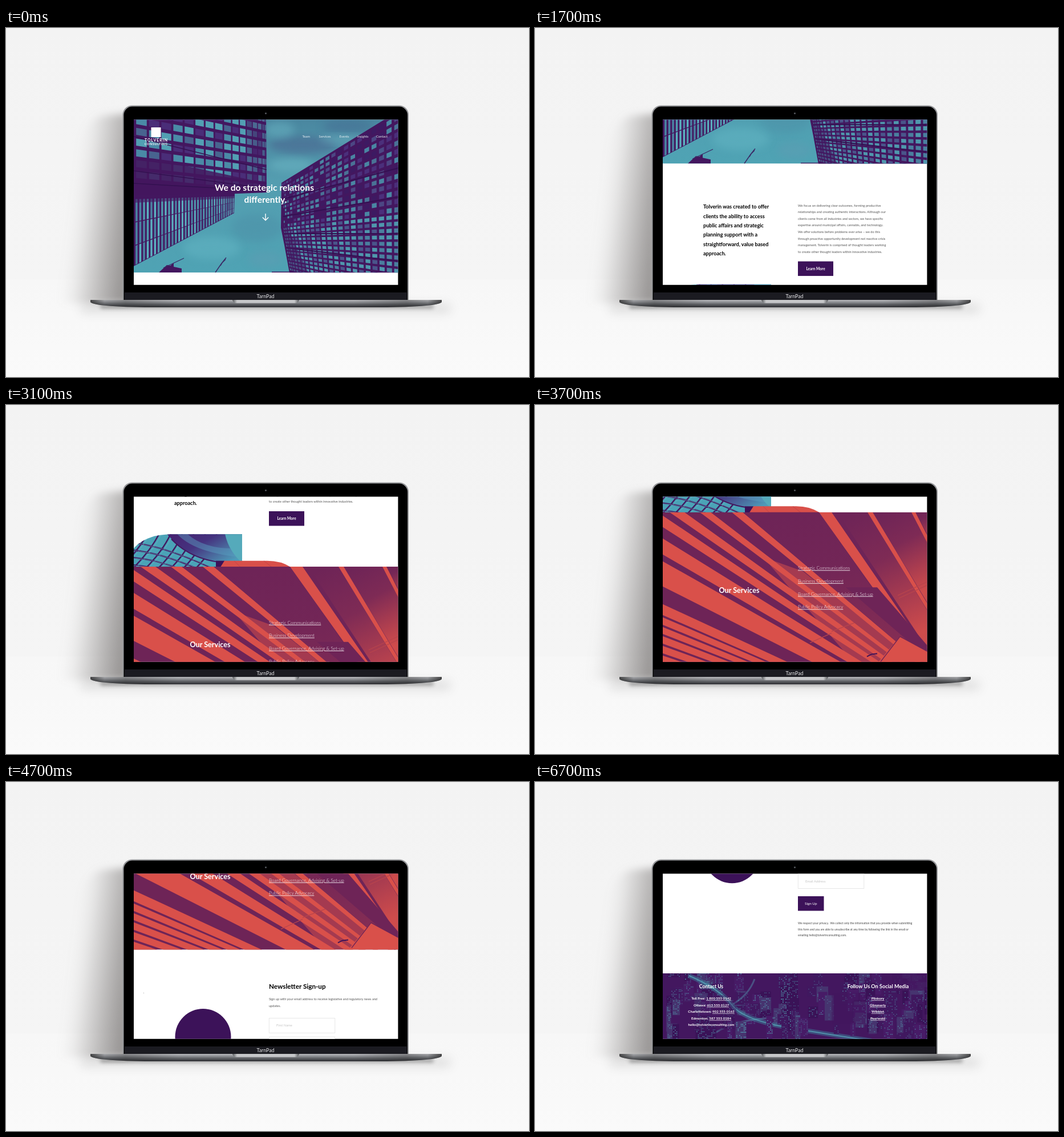
Recreate the animation shown at these times as an HTML page. Size 917 px wide and 611 px high, loop 7400 ms.

```html
<!DOCTYPE html>
<html lang="en">
<head>
<meta charset="utf-8">
<title>Website on a laptop</title>
<style>
  html, body { margin: 0; width: 100%; height: 100%; overflow: hidden; background: #f5f5f5; }
  svg { display: block; width: 100vw; height: 100vh; }
  text { font-family: Lato, "Open Sans", sans-serif; white-space: pre; }
  .u { text-decoration: underline; text-decoration-thickness: .5px; text-underline-offset: 1.6px; }
</style>
</head>
<body>
<svg viewBox="0 0 917 611" preserveAspectRatio="none">
  <defs>
    <linearGradient id="wall" x1="0" y1="0" x2="0" y2="1">
      <stop offset="0" stop-color="#f3f3f3"/><stop offset="1" stop-color="#f5f5f5"/>
    </linearGradient>
    <linearGradient id="floor" x1="0" y1="0" x2="0" y2="1">
      <stop offset="0" stop-color="#f7f7f7"/><stop offset=".4" stop-color="#f8f8f8"/><stop offset="1" stop-color="#fafafa"/>
    </linearGradient>
    <linearGradient id="shade" gradientUnits="userSpaceOnUse" x1="98" y1="440" x2="205" y2="453">
      <stop offset="0" stop-color="#8a8786" stop-opacity="0"/>
      <stop offset=".2" stop-color="#8a8786" stop-opacity=".09"/>
      <stop offset=".45" stop-color="#8a8786" stop-opacity=".34"/>
      <stop offset=".7" stop-color="#8a8786" stop-opacity=".6"/>
      <stop offset="1" stop-color="#8a8786" stop-opacity=".88"/>
    </linearGradient>
    <linearGradient id="base" x1="0" y1="0" x2="0" y2="1">
      <stop offset="0" stop-color="#b9babd"/><stop offset=".3" stop-color="#8f9195"/>
      <stop offset=".6" stop-color="#5f6165"/><stop offset="1" stop-color="#2c2d31"/>
    </linearGradient>
    <linearGradient id="ends">
      <stop offset="0" stop-color="#222" stop-opacity=".75"/><stop offset=".04" stop-color="#222" stop-opacity=".1"/>
      <stop offset=".1" stop-color="#222" stop-opacity=".3"/><stop offset=".25" stop-color="#222" stop-opacity="0"/>
      <stop offset=".75" stop-color="#222" stop-opacity="0"/><stop offset=".9" stop-color="#222" stop-opacity=".3"/>
      <stop offset=".96" stop-color="#222" stop-opacity=".1"/><stop offset="1" stop-color="#222" stop-opacity=".75"/>
    </linearGradient>
    <linearGradient id="notch">
      <stop offset="0" stop-color="#55575a"/><stop offset=".07" stop-color="#c6c7c9"/>
      <stop offset=".93" stop-color="#c6c7c9"/><stop offset="1" stop-color="#55575a"/>
    </linearGradient>
    <linearGradient id="sky" x1="0" y1="0" x2="0" y2="1">
      <stop offset="0" stop-color="#4a87a0"/><stop offset=".4" stop-color="#549db0"/><stop offset="1" stop-color="#4fa3b4"/>
    </linearGradient>
    <linearGradient id="dome" x1="0" y1="0" x2="1" y2=".7">
      <stop offset="0" stop-color="#47206f"/><stop offset=".45" stop-color="#45337f"/><stop offset="1" stop-color="#4e9ab8"/>
    </linearGradient>
    <linearGradient id="glow" x1=".2" y1="0" x2=".5" y2="1">
      <stop offset="0" stop-color="#d9504a" stop-opacity="0"/><stop offset=".4" stop-color="#d9504a" stop-opacity=".15"/>
      <stop offset="1" stop-color="#d9504a" stop-opacity=".9"/>
    </linearGradient>
    <filter id="soft" x="-30%" y="-30%" width="160%" height="160%"><feGaussianBlur stdDeviation="7"/></filter>
    <filter id="near" x="-10%" y="-200%" width="120%" height="500%"><feGaussianBlur stdDeviation="3"/></filter>
    <filter id="far" x="-10%" y="-300%" width="120%" height="700%"><feGaussianBlur stdDeviation="9"/></filter>
    <clipPath id="screen"><rect x="224" y="160.400" width="463.400" height="289.400"/></clipPath>
    <clipPath id="hero"><rect x="224" y="160" width="464" height="268.200"/></clipPath>
    <clipPath id="towerA"><path d="M224 160H456L457 286 224 294Z"/></clipPath>
    <clipPath id="towerB"><path d="M224 296 401 292 400 323 224 416Z"/></clipPath>
    <clipPath id="towerC"><path d="M483 271 664 160H688V429H497L483 350Z"/></clipPath>
    <clipPath id="arch"><path d="M224 697V664Q245 640 290 639.600H414V697Z"/></clipPath>
    <clipPath id="services"><rect x="224" y="696.300" width="464" height="264.700"/></clipPath>
    <clipPath id="footer"><rect x="224" y="1320.500" width="464" height="116"/></clipPath>
  </defs>

  <rect width="917" height="441" fill="url(#wall)"/>
  <rect y="440" width="917" height="171" fill="url(#floor)"/>
  <path d="M214 150 172 153Q142 156 128 200L86 440 100 482H214Z" fill="url(#shade)" filter="url(#soft)"/>
  <rect x="130" y="484" width="650" height="14" rx="7" fill="#777" opacity=".22" filter="url(#far)"/>
  <rect x="165" y="485" width="585" height="6" rx="3" fill="#666" opacity=".6" filter="url(#near)"/>

  <path d="M204.500 477V152A16.500 16.500 0 0 1 221 135.500H689.500A16.500 16.500 0 0 1 706 152V477Z" fill="#96979a"/>
  <path d="M206.500 477V152.500A15 15 0 0 1 221.500 137.500H689A15 15 0 0 1 704 152.500V477Z" fill="#000"/>
  <rect x="208" y="463" width="495" height="13.500" fill="#1b1b21"/>
  <circle cx="455.500" cy="149.500" r="1.800" fill="#34363a"/>
  <circle cx="455.500" cy="149.500" r=".7" fill="#85888c"/>
  <text x="455" y="473" font-size="8.800" fill="#e6e6e8" text-anchor="middle">TarnPad</text>

  <g id="deck">
    <path d="M148 476H764V480Q759 484 737 486 705 489 655 489H257Q207 489 175 486 153 484 148 480Z" fill="url(#base)"/>
    <path d="M148 476H764V480Q759 484 737 486 705 489 655 489H257Q207 489 175 486 153 484 148 480Z" fill="url(#ends)"/>
    <path d="M397 476H514Q513 481.500 507 481.500H404Q398 481.500 397 476Z" fill="url(#notch)"/>
  </g>

  <g clip-path="url(#screen)">
    <rect x="224" y="160" width="464" height="290" fill="#fff"/>
    <g id="page"></g>
  </g>
</svg>

<script>
const LOOP = 7400, HOLD = 700, STEP = 200, STEPS = 31, SCROLL = 985.5;
const PURPLE = '#43175f', INK = '#3c1259', TEAL = '#56a9b9', RED = '#d9504a', PLUM = '#6e2457';

let seed = 7;
const rand = () => (seed = seed * 16807 % 2147483647) / 2147483647;
const between = (a, b) => a + (b - a) * rand();
const fx = n => n.toFixed(1);

const path = (d, fill, more = '') => `<path d="${d}" fill="${fill}" ${more}/>`;
const line = (d, color, w, more = '') => path(d, 'none', `stroke="${color}" stroke-width="${w}" ${more}`);
const rect = (x, y, w, h, fill, more = '') =>
  `<rect x="${fx(x)}" y="${fx(y)}" width="${fx(w)}" height="${fx(h)}" fill="${fill}" ${more}/>`;
const text = (x, y, size, weight, fill, s, more = '') =>
  `<text x="${x}" y="${fx(y)}" font-size="${size}" font-weight="${weight}" fill="${fill}" ${more}>${s}</text>`;
const lines = (x, y, gap, size, weight, fill, list, more) =>
  list.map((s, i) => text(x, y + i * gap, size, weight, fill, s, more)).join('');
const clip = (id, s) => `<g clip-path="url(#${id})">${s}</g>`;
const MID = 'text-anchor="middle"';

// Window panes on a four-cornered facade; bend bunches the columns together.
function facade([a, b, c, d], cols, rows, gapU, gapV, bend, tones) {
  const at = (s, v) => {
    const u = bend(s), mix = k =>
      (a[k] * (1 - u) + b[k] * u) * (1 - v) + (d[k] * (1 - u) + c[k] * u) * v;
    return fx(mix(0)) + ' ' + fx(mix(1));
  };
  const ds = tones.map(() => '');
  for (let i = 0; i < cols; i++) for (let j = 0; j < rows; j++) {
    const u0 = (i + gapU) / cols, u1 = (i + 1) / cols, v0 = (j + gapV) / rows, v1 = (j + 1) / rows;
    ds[Math.floor(rand() * tones.length)] += `M${at(u0, v0)}L${at(u1, v0)} ${at(u1, v1)} ${at(u0, v1)}Z`;
  }
  return ds.map((p, k) => path(p, tones[k])).join('');
}

function hero() {
  let s = rect(224, 160, 464, 268.2, 'url(#sky)');
  const cloud = (x, y, rx, ry, fill, o) =>
    `<ellipse cx="${x}" cy="${y}" rx="${rx}" ry="${ry}" fill="${fill}" opacity="${o}" filter="url(#soft)"/>`;
  s += cloud(520, 205, 60, 16, '#4a5f8c', .5) + cloud(600, 172, 45, 12, '#456a92', .5)
    + cloud(500, 240, 40, 12, '#6fb9c6', .5) + cloud(480, 178, 26, 14, '#6ab3c2', .5)
    + cloud(590, 195, 40, 8, '#73b7c6', .4) + cloud(440, 350, 45, 25, '#4c8ba4', .4)
    + cloud(360, 385, 50, 20, '#63b6c4', .5) + cloud(455, 405, 30, 14, '#5f9cb2', .5);

  s += path('M224 160H456L457 288 224 297Z', PURPLE);
  s += clip('towerA', facade([[224, 92], [456, 150], [457, 284], [224, 262]], 16, 9, .18, .34,
    t => 1 - (1 - t) ** 1.6, ['#529fb3', '#4a8aa6', '#529fb3', '#48648f', '#4a2d78'])
    + path('M224 228 300 238 457 272V290L224 297Z', PURPLE, 'opacity=".85"')
    + path('M420 160H457V290L420 280Z', PURPLE, 'opacity=".4"')
    + line('M224 190 457 248M224 250 457 281M224 272 457 285', '#331050', 1.5));

  s += path('M224 293 401 289 400 324 224 417Z', PURPLE);
  s += clip('towerB', facade([[224, 298], [403, 294], [403, 324], [224, 422]], 36, 3, .46, .04,
    t => 1 - (1 - t) ** 1.35, ['#509bae', '#5bb0bf', '#4a83a2'])
    + path('M224 296 401 292V298L224 306Z', PURPLE, 'opacity=".6"'));

  s += path('M483 271 664 160H688V429H497L488 380 482 350Z', PURPLE);
  s += clip('towerC', facade([[484, 270], [690, 145], [690, 322], [487, 348]], 22, 12, .34, .4,
    t => t ** 1.5, ['#4a7296', '#4b2f7b', '#4c4784', '#4a86a3', '#3d1a62'])
    + facade([[486, 348], [690, 322], [690, 478], [498, 424]], 22, 13, .3, .38,
      t => t ** 1.5, ['#4f97ad', '#4a7f9f', '#4f97ad', '#4a558b'])
    + line('M484 300 688 245M486 330 688 296M488 360 688 360M492 385 688 408', '#351052', 2.2)
    + path('M500 428 486 345 490 342 530 428Z', PURPLE, 'opacity=".55"'));

  s += path('M268 428 282 415 288 416 294 411V418L308 421V428Z', PURPLE)
    + line('M276 420 312 403', '#3a2a66', 1.3)
    + line('M367 428 378 412 386 402M376 416 379 411 385 405', '#3a2a66', 1.5)
    + rect(466, 426.6, 34, 1.4, PURPLE);
  return clip('hero', s)
    + rect(254.500, 174, 17, 17, '#fff')
    + text(243, 198.6, 6.9, 700, '#fff', 'TOLVERIN', 'letter-spacing="1"')
    + text(243, 205.3, 5.6, 700, '#fff', 'CONSULTING', 'letter-spacing=".5"')
    + [['Team', 519.5], ['Services', 548.5], ['Events', 584.5], ['Insights', 616], ['Contact', 649]]
      .map(([t, x]) => text(x, 192.2, 5.8, 400, '#e6eef2', t)).join('')
    + text(453, 284.8, 15.7, 700, '#fff', 'We do strategic relations', MID)
    + text(455, 305.8, 15.5, 700, '#fff', 'differently.', MID)
    + line('M455 325V336.500M449.800 331.500 455 336.700 460.200 331.500', '#fff', 1.4);
}

const button = (y, w, label, size, weight) =>
  rect(461, y, w, 25.5, INK) + text(461 + w / 2, y + 15, size, weight, '#fff', label, MID);

function about() {
  return lines(295, 506.9, 16.35, 9.1, 700, '#000', [
    'Tolverin was created to offer', 'clients the ability to access', 'public affairs and strategic',
    'planning support with a', 'straightforward, value based', 'approach.'])
    + lines(461, 503.3, 11.6, 5.65, 400, '#555', [
    'We focus on delivering clear outcomes, forming productive',
    'relationships and creating authentic interactions. Although our',
    'clients come from all industries and sectors, we have specific',
    'expertise around municipal affairs, cannabis, and technology.',
    'We offer solutions before problems ever arise – we do this',
    'through proactive opportunity development not reactive crisis',
    'management. Tolverin is comprised of thought leaders working',
    'to create other thought leaders within innovative industries.'])
    + button(599.3, 62, 'Learn More', 6.5, 700);
}

function panels() {
  let beams = '';
  for (let i = 0; i < 7; i++) beams += `M${200 + i * 22} 700Q${232 + i * 22} 668 ${250 + i * 20} 636`;
  for (let i = 0; i < 5; i++) beams += `M218 ${654 + i * 13}Q280 ${660 + i * 12} 372 ${704 + i * 12}`;
  const photo = rect(224, 639, 190, 58, '#4ba3b7')
    + line(beams, PURPLE, 2.4) + line(beams, '#6cc0cd', .5, 'transform="translate(4 1)"')
    + path('M282 639H414V692Q330 694 282 639Z', 'url(#dome)')
    + path('M300 639Q330 672 414 680V664Q350 668 318 639Z', '#5a9fc0', 'opacity=".45"')
    + path('M384 639H414V690Q390 668 384 639Z', '#55aabb')
    + line('M290 648Q330 690 400 690', PURPLE, 2);
  return clip('arch', photo)
    + rect(368, 686, 15, 11, INK)
    + path('M376 697 383 686H458Q482 686 499 697Z', RED)
    + line('M400 686 411 697M452 686 466 697', '#b23d49', .6);
}

function services() {
  const top = 696.3;
  // Two fans of beams, each running towards its own far point.
  const wedge = (x0, y0, x1, y1, [vx, vy]) => `M${x0} ${y0}L${x1} ${y1} ${vx} ${vy}Z`;
  const low = [960, 1198], steep = [1085, 1518];
  const left = [[6, 26], [46, 74], [86, 130], [161, 180], [184, 197], [201, 213], [217, 230], [234, 247], [251, 270], [276, 330]];
  const above = [[236, 262], [289, 308], [345, 364]];
  const right = [[498, 520], [583, 592], [660, 667]];
  let s = rect(224, top, 464, 265, PLUM)
    + path(left.map(([a, b]) => wedge(224, top + a, 224, top + b, low)).join('')
      + above.map(([a, b]) => wedge(a, top, b, top, low)).join(''), RED)
    + path('M400 775 470 800 640 935 620 961H560Z', RED, 'opacity=".5"')
    + path('M376 696H498L690 970Z', PLUM);
  // Ceiling glow fading in towards the lower right.
  s += path('M364 696H498L690 970Z', 'url(#glow)', 'opacity=".25"')
    + path('M530 696H583L688 869V936Z', 'url(#glow)')
    + path('M592 696H660L688 750V855Z', 'url(#glow)')
    + path('M667 696H688V735Z', 'url(#glow)', 'opacity=".5"')
    + path(right.map(([a, b]) => wedge(a, top, b, top, steep)).join(''), RED)
    + path('M545 828 600 828 688 930V942L652 920Z', PLUM);
  s += line('M636 842 688 818M638 847 688 824M482 925 520 908M520 905 560 890', '#b8444c', 1.2)
    + path('M600 961 640 914 688 940V961Z', RED)
    + line('M640 914 606 958M688 940 640 914', PLUM, 1.5)
    + line('M582 949 590 945 600 944', INK, 2);
  return clip('services', s)
    + text(322.5, 837.6, 12.6, 700, '#fff', 'Our Services')
    + lines(461, 797, 22.7, 8.15, 300, '#fff', ['Strategic Communications', 'Business Development',
      'Board Governance, Advising &amp; Set-up', 'Public Policy Advocacy'], 'class="u"');
}

function newsletter() {
  const y = 794.7;
  return text(240.500, y + 244, 6, 400, '#888', '‹')
    + `<circle cx="345.500" cy="${y + 319}" r="49" fill="${INK}"/>`
    + text(461, y + 235.4, 11.7, 700, '#000', 'Newsletter Sign-up')
    + lines(461, y + 254.9, 11.6, 5.6, 400, '#555', [
      'Sign up with your email address to receive legislative and regulatory news and', 'updates.'])
    + ['First Name', 'Last Name', 'Email Address'].map((s, i) =>
      rect(461.3, y + 286.5 + i * 32.6, 115.5, 25.7, '#fff', 'stroke="#e2e2e2" stroke-width=".8"')
      + text(474, y + 301.3 + i * 32.6, 5.8, 400, '#c4c4c4', s)).join('')
    + button(y + 390.8, 45.5, 'Sign Up', 6.3, 400)
    + lines(461, y + 439.8, 10.7, 5, 400, '#444', [
      'We respect your privacy.  We collect only the information that you provide when submitting',
      'this form and you are able to unsubscribe at any time by following the link in the email or',
      'emailing hello@tolverinconsulting.com.']);
}

function footer() {
  const top = 1320.5;
  let s = rect(224, top, 464, 116, PURPLE);
  const road = `M270 ${top + 4}Q325 ${top + 28} 345 ${top + 55}T450 ${top + 96}T590 ${top + 118}`;
  const street = line(road, '#3d7f99', 8, 'opacity=".5"') + line(road, '#5cc0c9', 2, 'opacity=".6"')
    + line(`M345 ${top + 55}Q375 ${top + 38} 385 ${top + 10}M300 ${top + 116}Q340 ${top + 80} 420 ${top + 78}`, TEAL, 3, 'opacity=".4"');
  for (let k = 0; k < 110; k++) {
    const x = between(218, 685), y = top - 14 + k * .95, w = between(8, 24), h = between(18, 50);
    const lit = x < 470 ? .6 : .36;
    if (k === 80) s += street;
    s += rect(x, y, w, h, ['#3a1257', '#471b66', '#40185f', '#46346f'][k % 4]);
    let d = '';
    for (let a = 1.5; a < w - 1; a += 2.6) for (let b = 2; b < h - 1; b += 2.8)
      if (rand() < lit * .65) d += `M${fx(x + a)} ${fx(y + b)}h1.7v1.300h-1.700z`;
    s += path(d, TEAL, `opacity="${fx(between(.35, lit + .4))}"`);
  }
  s += rect(620, top, 68, 30, PURPLE, 'opacity=".75"') + rect(520, top + 34, 60, 55, PURPLE, 'opacity=".5"')
    + rect(255, top + 38, 98, 62, PURPLE, 'opacity=".35"');
  const link = t => `<tspan class="u">${t}</tspan>`;
  return clip('footer', s)
    + text(309, top + 26.3, 8.6, 700, '#fff', 'Contact Us', MID)
    + text(601.5, top + 26.3, 9.1, 700, '#fff', 'Follow Us On Social Media', MID)
    + lines(309, top + 46.2, 11.55, 6.15, 700, '#fff', [
      'Toll Free: ' + link('1 800 555 0142'), 'Ottawa: ' + link('613 555 0127'),
      'Charlottetown: ' + link('902 555 0163'), 'Edmonton: ' + link('587 555 0184'),
      'hello@tolverinconsulting.com'], MID)
    + lines(601, top + 46.2, 11.55, 6.2, 700, '#fff',
      ['Plinkory', 'Glimmerly', 'Wibblet', 'Peerwold'].map(link), MID);
}

const page = document.getElementById('page');
page.innerHTML = hero() + about() + panels() + services() + newsletter() + footer();

function draw(now) {
  const t = now % LOOP;
  const n = t < HOLD ? 0 : Math.min(STEPS, Math.floor((t - HOLD) / STEP) + 1);
  page.setAttribute('transform', `translate(0 ${-SCROLL * n / STEPS})`);
}

const start = performance.now();
function tick() {
  draw(performance.now() - start);
  requestAnimationFrame(tick);
}
tick();
</script>
</body>
</html>
```
